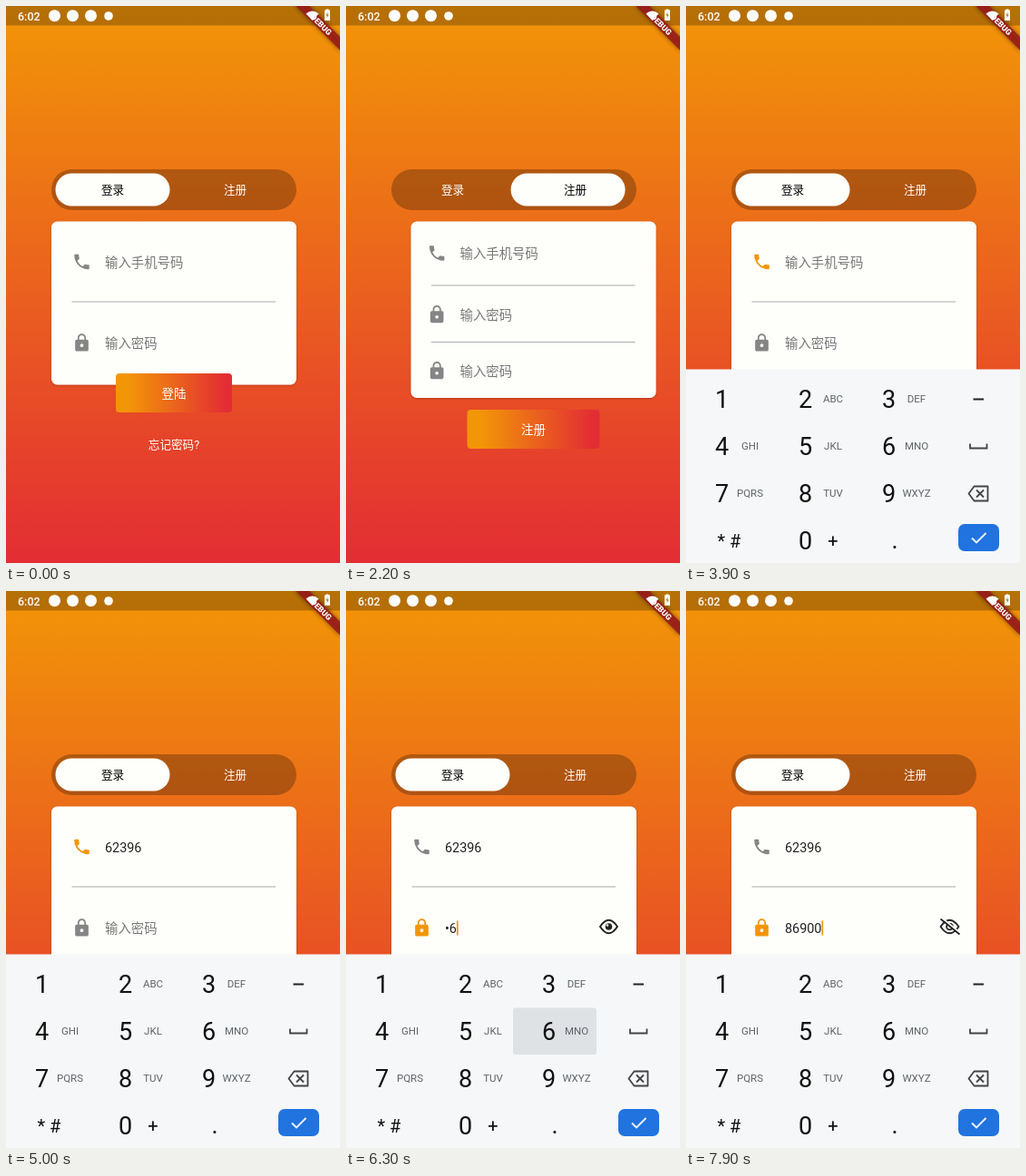
Animation of 368x614 px, one loop 8 s. Source, as an HTML page:

```html
<!DOCTYPE html>
<html lang="zh-CN">
<head>
<meta charset="utf-8">
<title>登录</title>
<style>
html, body { margin: 0; width: 100%; height: 100%; overflow: hidden; }
svg { display: block; width: 100vw; height: 100vh; font-family: Roboto, 'Noto Sans CJK SC', 'Noto Sans CJK', sans-serif; }
text { white-space: pre; }
</style>
</head>
<body>
<svg id="stage" viewBox="0 0 368 614"></svg>
<script>
const LOOP = 8000;
const ORANGE = '#f29607', RED = '#e32d34', GREY = '#858585', PAPER = '#fefefb';
const PHONE = 'M6.62 10.79c1.44 2.83 3.76 5.14 6.59 6.59l2.2-2.2c.27-.27.67-.36 1.02-.24 1.12.37 2.33.57 3.57.57.55 0 1 .45 1 1V20c0 .55-.45 1-1 1-9.39 0-17-7.61-17-17 0-.55.45-1 1-1h3.5c.55 0 1 .45 1 1 0 1.25.2 2.45.57 3.57.11.35.03.74-.25 1.02l-2.2 2.2z';
const LOCK = 'M18 8h-1V6c0-2.76-2.24-5-5-5S7 3.24 7 6v2H6c-1.1 0-2 .9-2 2v10c0 1.1.9 2 2 2h12c1.1 0 2-.9 2-2V10c0-1.1-.9-2-2-2zm-6 9c-1.1 0-2-.9-2-2s.9-2 2-2 2 .9 2 2-.9 2-2 2zm3.1-9H8.9V6c0-1.71 1.39-3.1 3.1-3.1 1.71 0 3.1 1.39 3.1 3.1v2z';

// Markup helpers; text y is the visual centre of the line.
const label = (s, x, y, size, fill, extra = '') =>
  `<text x="${x}" y="${y + size * 0.37}" font-size="${size}" fill="${fill}" ${extra}>${s}</text>`;
const mid = (s, x, y, size, fill, extra = '') => label(s, x, y, size, fill, 'text-anchor="middle" ' + extra);
const rect = (x, y, w, h, r, fill, extra = '') =>
  `<rect x="${x}" y="${y}" width="${w}" height="${h}" rx="${r}" fill="${fill}" ${extra}/>`;
const icon = (d, x, y, id = '') => `<path id="${id}" d="${d}" fill="${GREY}" transform="translate(${x} ${y}) scale(.917)"/>`;
const rule = y => rect(72.5, y, 224.5, 1, 0, '#acacac');
const hint = (s, x, y, id = '') => label(s, x, y, 14.4, '#777', `id="${id}"`);
const card = h => rect(50, 237.5, 270, h, 6.5, PAPER, 'filter="url(#soft)"');
const button = (s, x, y, w) => rect(x, y, w, 43, 4, 'url(#across)') + mid(s, 185, y + 22, 13.5, '#fff');

const loginPage = card(180) +
  icon(PHONE, 72.5, 271, 'phoneIcon') + hint('输入手机号码', 109, 282.5, 'phoneHint') + rule(325.5) +
  icon(LOCK, 72.5, 360.4, 'lockIcon') + hint('输入密码', 109, 371.5, 'passHint') +
  `<text id="phoneText" x="109" y="287.6" font-size="14.4" fill="#222"/>
   <text id="passText" x="109" y="376.6" font-size="14.4" fill="#222"/>` +
  rect(109, 0, 1.7, 16, 0, ORANGE, 'id="caret"') +
  `<g id="eye" fill="none" stroke="#222" stroke-width="2">
     <path d="M280 370Q289.500 355.500 299 370Q289.500 384.500 280 370Z" stroke-linejoin="round"/>
     <circle cx="289.500" cy="370" r="3.8" fill="#222" stroke="none"/>
     <circle cx="288" cy="368.500" r="1.3" fill="${PAPER}" stroke="none"/>
   </g>
   <g id="eyeOff" fill="none" stroke="#222" stroke-width="1.8">
     <path d="M280.500 370Q290.500 355.500 300.500 370Q290.500 384.500 280.500 370Z" stroke-linejoin="round"/>
     <circle cx="290.500" cy="370" r="3.4"/>
     <path d="M281.500 360L302 377" stroke="${PAPER}" stroke-width="2"/>
     <path d="M280.500 361.500L301.500 378.500"/>
   </g>` +
  button('登陆', 121, 405, 128) + mid('忘记密码?', 185, 483.5, 12.6, '#fff');

const signupPage = card(194.5) +
  icon(PHONE, 67.6, 261.5) + hint('输入手机号码', 104, 273) + rule(307.5) +
  icon(LOCK, 67.6, 329) + hint('输入密码', 104, 340.5) + rule(370) +
  icon(LOCK, 67.6, 391) + hint('输入密码', 104, 402.5) +
  button('注册', 112, 445, 146);

const ROWS = [433.5, 485.5, 537.5, 589];
const LETTERS = ['', 'ABC', 'DEF', 'GHI', 'JKL', 'MNO', 'PQRS', 'TUV', 'WXYZ'];
const keys = LETTERS.map((s, i) => {
  const x = i % 3 * 92, y = ROWS[i / 3 | 0];
  return label(i + 1, x + 32, y, 27, '#111') + mid(s, x + 70.5 - (x ? 0.5 : 0), y - 0.5, 11.5, '#5f6368');
}).join('');
const keyboard = rect(0, 400.5, 368, 214, 0, '#f5f7f8') + rect(0, 0, 92, 51.5, 3, '#dfe2e5', 'id="press"') + keys +
  label('0', 124, 589, 27, '#111') + mid('* #', 47.5, 590, 20, '#111') +
  mid('+', 162, 589, 20, '#111') + mid('.', 230, 588.5, 27, '#111') +
  rect(316.500, 432.500, 11.500, 2, 0, '#222') +
  `<g fill="none" stroke="#444" stroke-width="1.8">
     <path d="M313 482.500V487.500H331.500V482.500"/>
     <path d="M317.500 529.500H332.500V545.500H317.500L311.500 537.500Z" stroke-linejoin="round"/>
     <path d="M320 533.500L328 541.500M328 533.500L320 541.500"/>
   </g>` +
  rect(300, 571, 45, 30, 7, '#2173e0') +
  '<path d="M315 586.500L320 591.500L330.500 581" fill="none" stroke="#fff" stroke-width="1.8"/>';

const status = label('6:02', 13, 11.300, 12.5, '#fff', 'font-weight="500"') +
  [53.5, 73.5, 93.5].map(x => `<circle cx="${x}" cy="10.700" r="6.500" fill="#fff"/>`).join('') +
  `<circle cx="113" cy="11" r="4.800" fill="#fff"/>
   <path d="M330.500 8.500Q337.500 2.500 344.500 8.500L337.500 16Z" fill="#fff"/>
   <path d="M352.500 4.500V3.500H355.500V4.500H357V16H351V4.500Z" fill="#fff"/>
   <path d="M354.500 6.500L352.500 10.500H354L353.500 13.500L355.700 9.500H354.200Z" fill="#b06a10"/>`;

const banner = `<g transform="translate(368 0) rotate(45)">` +
  rect(-34.4, 24, 68.8, 10.4, 0, '#000', 'opacity=".5" filter="url(#blur)"') +
  rect(-34.4, 24, 68.8, 10.4, 0, '#9d1d1a', 'opacity=".9"') +
  mid('DEBUG', 0, 29, 8.8, '#fff', 'font-weight="900"') + '</g>';

document.getElementById('stage').innerHTML = `
<defs>
  <linearGradient id="down" x2="0" y2="1"><stop stop-color="${ORANGE}"/><stop offset="1" stop-color="${RED}"/></linearGradient>
  <linearGradient id="across" x1=".1" x2=".95"><stop stop-color="${ORANGE}"/><stop offset="1" stop-color="${RED}"/></linearGradient>
  <filter id="soft"><feDropShadow dx="0" dy=".8" stdDeviation=".9" flood-opacity=".25"/></filter>
  <filter id="blur" x="-20%" y="-100%" width="140%" height="300%"><feGaussianBlur stdDeviation="2.500"/></filter>
</defs>
${rect(0, 0, 368, 614, 0, 'url(#down)')}
${rect(0, 0, 368, 21.5, 0, '#000', 'opacity=".25"')}
${rect(50, 180, 270, 45, 22.5, '#000', 'opacity=".26"')}
${rect(54.5, 184.5, 126, 36, 18, PAPER, 'id="pill"')}
${mid('登录', 117.5, 202.5, 12.6, '#000', 'id="tabLogin"')}
${mid('注册', 252.5, 202.5, 12.6, '#fff', 'id="tabSignup"')}
<g id="login">${loginPage}</g>
<g id="signup">${signupPage}</g>
<g id="keyboard">${keyboard}</g>
${banner}${status}`;

const $ = Object.fromEntries([...document.querySelectorAll('svg [id]')].map(e => [e.id, e]));
const show = (el, on) => el.setAttribute('visibility', on ? 'visible' : 'hidden');
const clamp = v => Math.max(0, Math.min(1, v));

const phone = { value: '62396', times: [3960, 4080, 4200, 4340, 4490], focus: 3280 };
const pass = { value: '86900', times: [6100, 6230, 6350, 6480, 6595], focus: 5480 };
const REVEAL = 7480;
const KEYBOARD = [[3430, 5060], [5600, 7060], [7540, Infinity]];

// Accelerating drag, then an exponential settle at matching speed.
function swipe(t) {
  if (t <= 0) return 0;
  const left = 168 * Math.exp(-(t - 262) / 110);
  return t < 262 ? 200 * (t / 262) ** 2 : left < 0.3 ? 368 : 368 - left;
}

function keyboardPose(t) {
  const span = KEYBOARD.find(([a, b]) => t >= a && t < b + 240);
  if (!span) return [214, 0];
  if (t < span[1]) {
    const p = clamp((t - span[0]) / 330);
    return [214 * (1 - p) ** 3, clamp(p * 2)];
  }
  const p = (t - span[1]) / 240;
  return [214 * p ** 3.3, clamp(1 - 1.08 * p)];
}

const typed = (f, t) => f.value.slice(0, f.times.filter(k => k <= t).length);

function drawCaret(t, field, text, y) {
  const events = [field.focus, ...field.times, field === pass ? REVEAL : 0];
  const since = t - Math.max(...events.filter(e => e <= t));
  show($.caret, since < 500 || since % 1000 < 500);
  const width = [...text].reduce((w, c) => w + (c === '•' ? 4.86 : 8.09), 0);
  $.caret.setAttribute('x', 109 + width - (text ? 0 : 0.5));
  $.caret.setAttribute('y', y);
}

function drawPress(t) {
  let digit = null;
  for (const f of [phone, pass])
    f.times.forEach((k, i) => { if (t >= k - 40 && t < k + 100) digit = +f.value[i]; });
  show($.press, digit !== null);
  if (digit === null) return;
  const i = digit ? digit - 1 : 10;
  $.press.setAttribute('x', i % 3 * 92);
  $.press.setAttribute('y', 408 + 51.6 * (i / 3 | 0));
}

function draw(t) {
  const scroll = swipe(t - 1150) - swipe(t - 2115);
  $.login.setAttribute('transform', `translate(${-scroll} 0)`);
  $.signup.setAttribute('transform', `translate(${368 - scroll} 0)`);
  $.pill.setAttribute('x', 54.5 + 270 * scroll / 736);
  $.tabLogin.setAttribute('fill', scroll < 184 ? '#000' : '#fff');
  $.tabSignup.setAttribute('fill', scroll < 184 ? '#fff' : '#000');

  const onPass = t >= pass.focus, onPhone = t >= phone.focus && !onPass;
  $.phoneIcon.setAttribute('fill', onPhone ? ORANGE : GREY);
  $.lockIcon.setAttribute('fill', onPass ? ORANGE : GREY);

  const number = typed(phone, t), secret = typed(pass, t);
  const masked = t >= REVEAL ? secret : '•'.repeat(Math.max(0, secret.length - 1)) + secret.slice(-1);
  $.phoneText.textContent = number;
  $.passText.textContent = masked;
  show($.phoneHint, !number);
  show($.passHint, !secret);
  show($.eye, secret && t < REVEAL);
  show($.eyeOff, t >= REVEAL);

  if (onPass) drawCaret(t, pass, masked, 363.5);
  else if (onPhone) drawCaret(t, phone, number, 274.5);
  else show($.caret, false);

  const [drop, alpha] = keyboardPose(t);
  $.keyboard.setAttribute('transform', `translate(0 ${drop})`);
  $.keyboard.setAttribute('opacity', alpha);
  drawPress(t);
}

const start = performance.now();
function tick() {
  draw((performance.now() - start) % LOOP);
  requestAnimationFrame(tick);
}
tick();
</script>
</body>
</html>
```
